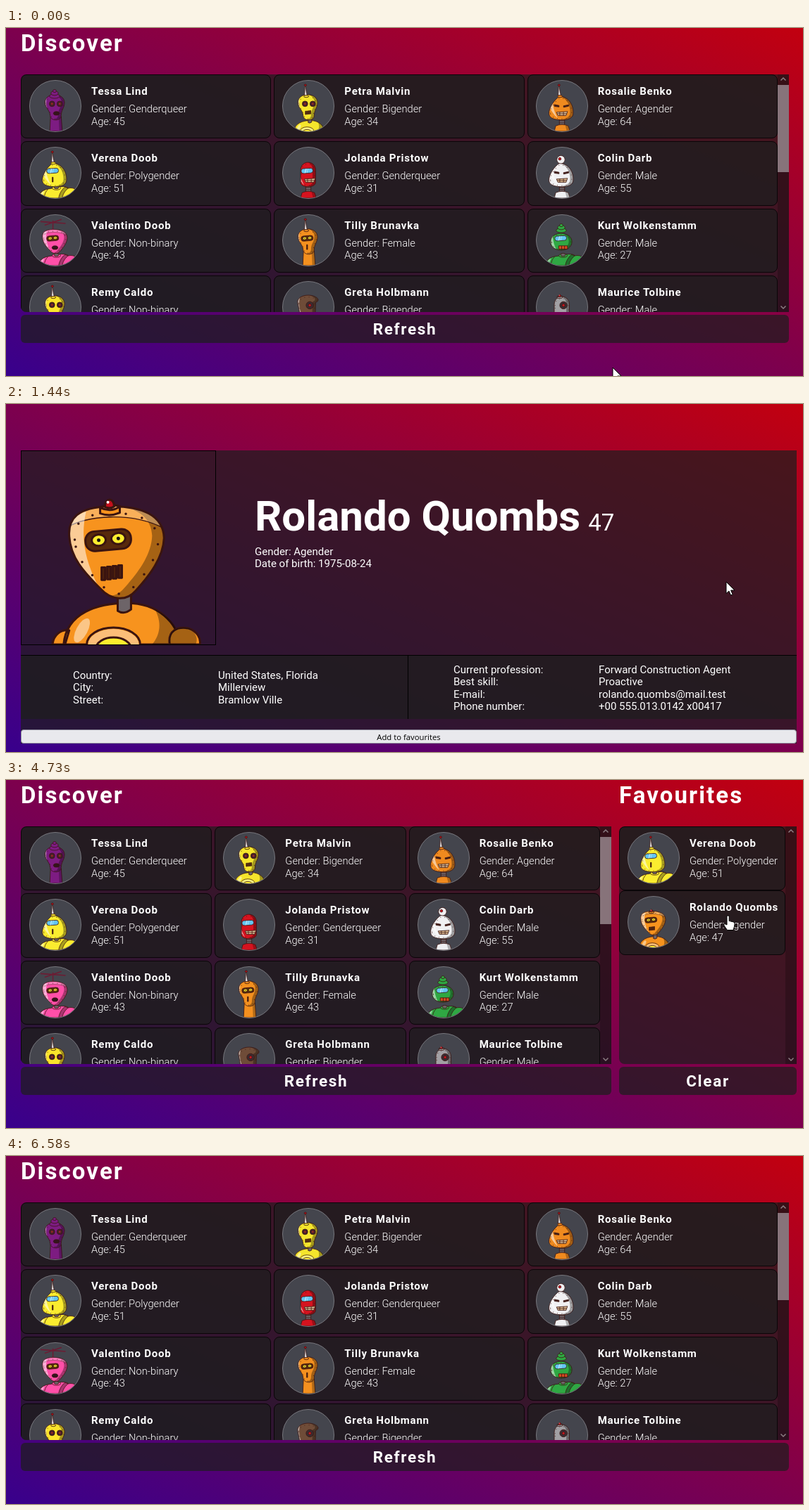
Recreate the animation shown at these times as an HTML page. Size 1131 by 495 pixels, loop 6.62 s.

```html
<!DOCTYPE html>
<html lang="en">
<head>
<meta charset="utf-8">
<title>Discover</title>
<style>
html, body { margin: 0; width: 100%; height: 100%; overflow: hidden; }
body { position: relative; background: linear-gradient(to top right, #38008c, #c2000f);
  color: #fff; font: 15px/18px Roboto, sans-serif; }
div, p, h1, h2, #cursor, #dot { position: absolute; margin: 0; box-sizing: border-box; white-space: nowrap; }
#list, #detail { inset: 0; }
.panel, .button, .sheet { background: rgba(30, 30, 30, .72); }
h1 { top: 2px; font: bold 33px/39px Roboto, sans-serif; letter-spacing: 2.1px; }
.panel { top: 66px; height: 338px; overflow: hidden; border-radius: 8px 0 0 8px; }
.grid { display: grid; grid-template-columns: repeat(3, 1fr); grid-auto-rows: 91.33px; gap: 4px; left: 0; right: 16px; }
.favs { display: block; }
.card { position: relative; height: 91.33px; border: 1px solid #0a0608; border-radius: 8px; background: rgba(30, 30, 30, .75); }
.card svg { position: absolute; left: 11px; top: 7px; width: 74px; height: 74px; box-sizing: border-box;
  border: 1px solid #77777d; border-radius: 50%; background: #44454d; }
.card p { left: 99px; font-size: 14.7px; font-weight: 300; }
.card .name { font-size: 15px; font-weight: bold; letter-spacing: .05em; }
.bar { right: 0; top: 0; width: 16px; height: 338px; background: rgba(0, 0, 0, .22); }
.bar svg { position: absolute; left: 0; top: 0; }
#thumb { width: 16px; height: 124px; background: #87737a; }
.button { top: 408px; height: 40px; border-radius: 6px; text-align: center;
  font: bold 22.5px/40px Roboto, sans-serif; letter-spacing: .075em; }
#favourites { display: none; }
.split #favourites { display: block; }
#discover, #refresh { left: 21px; width: 1090px; }
.split #discover, .split #refresh { width: 838px; }
.side { left: 870px; width: 252px; }
.sheet { left: 21px; top: 66px; width: 1101px; height: 417px; }
.portrait { left: 21px; top: 66px; width: 277px; height: 277px; border: 1px solid #000; }
.facts { left: 21px; top: 357px; width: 1101px; height: 91px; border-top: 1px solid #000; background: rgba(30, 30, 30, .75); }
.facts::after { content: ""; position: absolute; left: 549px; height: 90px; border-left: 1px solid #000; }
h2 { left: 353px; top: 125px; font: bold 60px/70px Roboto, sans-serif; }
h2 span { margin-left: 11px; font-size: 33px; font-weight: 400; }
#toggle { left: 21px; top: 463px; width: 1101px; height: 20px; border: 1px solid #8f8f9d; border-radius: 4px;
  color: #000; text-align: center; font: 11.3px/19px "Open Sans", sans-serif; }
#dot { left: -12px; top: -12px; width: 22px; height: 22px; border-radius: 50%; background: rgba(222, 212, 70, .8); }
#cursor { left: 0; top: 0; }
#cursor svg { position: absolute; left: -12px; top: -4px; }
</style>
</head>
<body>
<div id="list">
  <h1 style="left:21px">Discover</h1>
  <div class="panel" id="discover"><div class="grid" id="grid"></div>
    <div class="bar"><div id="thumb"></div></div></div>
  <div class="button" id="refresh">Refresh</div>
  <div id="favourites">
    <h1 style="left:870px">Favourites</h1>
    <div class="panel side"><div class="grid favs" id="favs"></div><div class="bar"></div></div>
    <div class="button side">Clear</div>
  </div>
</div>
<div id="detail">
  <div class="sheet"></div>
  <div id="profile"></div>
  <div id="toggle"></div>
</div>
<div id="cursor"><div id="dot"></div>
  <svg width="32" height="32" viewBox="-12 -4 32 32" fill="#fff" stroke="#000">
    <path id="arrow" d="M0 0V16.5L3.9 13 6.6 19 9.2 17.9 6.6 12H12Z"/>
    <path id="hand" d="M-2 12V1.5a1.6 1.6 0 0 1 3.2 0V7.5l6 1.4q2 .6 1.8 3L8.4 16 7 20.5H-1.5L-6 14q-1-2 1-2.4L-2 13Z"/>
  </svg>
</div>
<script>
const $ = id => document.getElementById(id);
const LOOP = 6620, INK = '#3a1410';

const heads = {
  heart: 'M68 122C66 96 80 80 125 79C172 78 202 92 203 124C202 152 182 178 162 200C150 214 128 214 112 196C88 172 70 152 68 122Z',
  drop: 'M67 179C67 149 94 104 124 86C150 86 170 98 184 119C198 140 202 170 197 189C187 209 160 216 129 214C92 212 69 202 67 179Z',
  tall: 'M96 125C96 66 178 66 178 125V190C178 222 96 222 96 190Z',
  skull: 'M82 118C82 62 186 62 188 118C188 150 170 158 170 190C170 222 112 222 110 190C108 158 82 150 82 118Z',
  round: 'M76 145C76 85 190 85 192 145C192 208 76 208 76 145Z',
  hood: 'M80 110C80 70 160 60 190 92Q196 108 178 112L176 190C170 215 100 212 94 188Z'
};
const ellipse = (x, y, rx, ry, fill, more = '') => `<ellipse cx="${x}" cy="${y}" rx="${rx}" ry="${ry}" fill="${fill}" ${more}/>`;
const path = (d, fill, more = '') => `<path d="${d}" fill="${fill}" ${more}/>`;
const bare = 'stroke="none"';

const tops = {
  antenna: c => path('M116 80C120 62 118 40 121 28H124C124 48 128 64 132 80Z', '#ddd') +
    ellipse(127, 85, 13, 6, c) + ellipse(122, 24, 6, 5, '#c4101c'),
  knob: c => path('M112 81Q126 74 140 79V88Q126 94 112 89Z', c) + path('M112 81Q126 74 140 79Q128 88 112 81Z', '#fff5') +
    path('M119 80C118 66 132 66 132 79Q126 83 119 80Z', '#c4101c') + ellipse(123, 73, 2, 2, '#fff', bare),
  ball: c => ellipse(132, 66, 22, 22, c) + ellipse(126, 62, 7, 7, '#d01020'),
  bun: c => ellipse(134, 84, 28, 12, c) + ellipse(134, 68, 20, 12, c) + ellipse(134, 56, 9, 8, c),
  rotor: () => path('M125 80V30M58 36L194 46M80 56L172 24', 'none', 'stroke="#6b1c33" stroke-width="6"'),
  none: () => ''
};
const eyes = {
  visor: () => `<g transform="rotate(-4 123 127)"><rect x="91" y="114" width="64" height="26" rx="12" fill="#63c6f2"/>${
    path('M108 139L116 115H122L114 139ZM120 139L128 115H131L123 139Z', '#fff8', bare)}</g>`,
  slot: () => `<g transform="rotate(-5 124 127)"><rect x="91" y="113" width="65" height="28" rx="13" fill="#57290c"/>${[110, 138].map(x =>
    ellipse(x, 126, 10, 8, '#fdec2e') + ellipse(x, 126, 2.5, 2.5, '#111', bare)).join('')}</g>`,
  dark: () => [112, 154].map(x => ellipse(x, 126, 15, 15, '#46202a') + ellipse(x, 126, 5, 5, '#a32a20', bare)).join(''),
  slits: () => path('M96 130L122 135V143L97 140ZM146 137L174 131V139L147 145Z', '#43201a'),
  one: () => ellipse(138, 128, 20, 20, '#3a2c32') + ellipse(138, 128, 8, 8, '#c01a22')
};
const bars = (x, y, n, h) => Array.from({length: n}, (_, i) =>
  `<rect x="${x + i * 8}" y="${y - i}" width="5" height="${h}" fill="#4d210e"/>`).join('');
const mouths = {
  grille: () => bars(114, 166, 4, 18),
  nose: () => bars(121, 162, 1, 26),
  grin: () => path('M108 172L168 168L160 190L116 190Z', '#d8b890') + path('M112 180H164M126 172V190M146 170V190', 'none'),
  open: () => ellipse(136, 178, 16, 10, '#33141c'),
  red: () => path('M112 168H160V186H112Z', '#d24a20') + path('M128 168V186M144 168V186', 'none')
};
const neck = path('M137 205V228Q146 234 156 226V205Z', '#6d6468');
const bodies = {
  wide: c => path('M44 276C46 262 56 254 68 256L62 276ZM60 276C64 230 110 217 150 217C195 217 222 245 226 276Z', c) +
    path('M190 226C214 238 224 252 225 276H186C198 262 200 244 190 226Z', '#0005', bare) +
    path('M211 276C208 256 222 250 238 253C250 257 256 268 254 276Z', c) +
    path('M211 276C208 256 222 250 238 253C248 258 252 268 248 276Z', '#0005', bare) +
    ellipse(86, 256, 8, 19, '#fff7', 'stroke="none" transform="rotate(28 86 256)"') +
    ellipse(131, 276, 38, 24, c) + ellipse(131, 276, 36, 22, '#fff6', bare) + ellipse(131, 282, 25, 16, '#fdec2e') + neck,
  shoulders: c => path('M46 276C50 246 74 226 114 224C160 210 200 210 208 222C250 214 262 240 264 276Z', c) +
    path('M156 276C160 250 176 226 190 216L208 222C186 240 178 258 176 276ZM234 276C234 255 240 235 250 227C260 238 264 258 264 276Z', '#0005') +
    path('M78 276C78 255 86 238 98 228', 'none') + path('M50 270Q56 246 78 236L66 272Z', '#fff7', bare) +
    ellipse(144, 221, 23, 10, c) + ellipse(144, 217, 13, 8, '#6d6468'),
  narrow: c => path('M124 205H152V242H124Z', '#6d6468') + path('M124 218H152M124 230H152', 'none') +
    path('M96 276L104 246Q138 232 172 246L182 276Z', c) + path('M156 243L172 247 181 276H164Z', '#0004', bare),
  column: c => path('M112 195L108 276H176L170 195Z', c) + path('M156 195H170L176 276H160Z', '#0004', bare)
};

function robot([color, head, top, eye, mouth, body]) {
  const shape = heads[head], skin = (fill, more = '') => path(shape, fill, bare + ' ' + more);
  const shift = head === 'heart' || head === 'drop' ? 0 : 8;
  const cap = head === 'heart' ? path('M60 112C90 90 160 86 206 112V70H60Z', '#fff4', 'stroke-width="1.5"') : '';
  return `<svg viewBox="0 0 276 276"><g stroke="${INK}" stroke-width="3" stroke-linejoin="round">${bodies[body](color)}
    <g clip-path="url(#clip-${head})">${skin(color)}${skin('#0005')}${skin(color, 'transform="translate(-17 -3)"')}${cap}
    ${path('M62 100C62 140 86 180 116 206C94 166 82 130 92 86Z', '#fff8', bare)}</g>
    ${path(shape, 'none')}
    ${path(shape, 'none', 'transform="translate(16 19) scale(.88)" stroke-width="4" stroke-linecap="round" stroke-dasharray="0 27"')}
    ${tops[top](color)}<g transform="translate(${shift})">${eyes[eye]()}${mouths[mouth]()}</g></g></svg>`;
}

const people = `Tessa Lind|Genderqueer|45|#7d1c82 skull bun dark open column
Petra Malvin|Bigender|34|#f5e52c skull antenna dark grille wide
Rosalie Benko|Agender|64|#ef8a1f drop antenna slits grin narrow
Verena Doob|Polygender|51|#fbec2f drop antenna visor nose shoulders
Jolanda Pristow|Genderqueer|31|#d5131f tall none visor grin narrow
Colin Darb|Male|55|#f0f0f2 drop ball slits grin narrow
Valentino Doob|Non-binary|43|#ff4fa8 heart rotor slot open shoulders
Tilly Brunavka|Female|43|#f3901f skull antenna slot nose column
Kurt Wolkenstamm|Male|27|#2fa843 round bun visor red shoulders
Remy Caldo|Non-binary|24|#fbe42b skull antenna dark red narrow
Greta Holbmann|Bigender|50|#6f4c38 hood none one open wide
Maurice Tolbine|Male|43|#a2a0a4 tall knob one grin narrow
Osvaldo Renbick|Male|51|#f28d1c tall antenna slot grille wide
Norbert Zielund|Genderfluid|33|#2ba2e4 heart none one open narrow
Rolando Quombs|Agender|47|#f7931e heart knob slot grille wide
Elvina Marsk|Female|38|#2fa843 drop antenna visor grin narrow
Tobin Fellwick|Male|29|#d5131f skull knob dark open column
Ilka Brandul|Agender|60|#2ba2e4 round ball slits red shoulders
Jorun Pallix|Bigender|41|#7d1c82 heart antenna slot grille wide
Mirle Sandok|Female|36|#f0f0f2 tall knob visor nose narrow
Dorin Kvelt|Male|22|#fbe42b hood none one open wide`.split('\n').map(row => {
  const [name, gender, age, look] = row.split('|');
  return {name, gender, age, picture: robot(look.split(' '))};
});

const VERENA = 3, ROLANDO = 14;
Object.assign(people[VERENA], {born: '1971-05-23',
  home: ['United States, Montana', 'East Racheleport', 'Orletta Village'],
  work: ['Community-Services Manager', 'Communication', 'verena.doob@mail.test', '+000 555.014.0168 x1083']});
Object.assign(people[ROLANDO], {born: '1975-08-24',
  home: ['United States, Florida', 'Millerview', 'Bramlow Ville'],
  work: ['Forward Construction Agent', 'Proactive', 'rolando.quombs@mail.test', '+00 555.013.0142 x00417']});

const text = (x, y, value, name = '') => `<p class="${name}" style="left:${x}px;top:${y}px">${value}</p>`;
const lines = (x, y, values) => values.map((v, i) => text(x, y + i * 17.5, v)).join('');
const card = p => `<div class="card">${p.picture}${text(99, 14, p.name, 'name')}${
  lines(99, 39, ['Gender: ' + p.gender, 'Age: ' + p.age])}</div>`;
const profile = p => `<div class="portrait">${p.picture}</div><div class="facts"></div>
  <h2>${p.name}<span>${p.age}</span></h2>
  ${lines(353, 200.5, ['Gender: ' + p.gender, 'Date of birth: ' + p.born])}
  ${lines(95, 376.5, ['Country:', 'City:', 'Street:'])}${lines(301, 376.5, p.home)}
  ${lines(635, 368.5, ['Current profession:', 'Best skill:', 'E-mail:', 'Phone number:'])}${lines(841, 368.5, p.work)}`;

document.body.insertAdjacentHTML('beforeend', `<svg width="0" height="0" style="position:absolute">${
  Object.entries(heads).map(([id, d]) => `<clipPath id="clip-${id}"><path d="${d}"/></clipPath>`).join('')}</svg>`);
document.querySelectorAll('.bar').forEach(bar => bar.insertAdjacentHTML('beforeend',
  `<svg width="16" height="338">${path('M4.5 8.5L8 5L11.5 8.5M4.5 329.5L8 333L11.5 329.5', 'none', 'stroke="#8b7d83" stroke-width="1.5"')}</svg>`));
$('grid').innerHTML = people.map(card).join('');

// Start time, then either the favourites of the list page or a person and whether they are a favourite
const scenes = [
  [0, {favs: []}],
  [1400, {person: ROLANDO, saved: false}],
  [2400, {person: ROLANDO, saved: true}],
  [2980, {favs: [ROLANDO]}],
  [3240, {person: VERENA, saved: false}],
  [3800, {person: VERENA, saved: true}],
  [4120, {favs: [VERENA, ROLANDO]}],
  [5020, {person: ROLANDO, saved: true}],
  [5580, {person: ROLANDO, saved: false}],
  [5860, {favs: [VERENA]}],
  [6290, {favs: []}]
];
const clicks = [1340, 2310, 3180, 3740, 4980, 5480, 6220];
const pointer = [[0, 861, 483], [440, 1025, 225], [1380, 1025, 225], [1440, 1022, 253], [1730, 1022, 253],
  [2250, 704, 469], [2400, 704, 469], [2730, 611, 353], [2980, 406, 247], [3150, 287, 208], [3250, 287, 208],
  [3650, 287, 461], [3710, 287, 469], [3820, 287, 469], [4410, 690, 253], [4710, 1025, 193], [5020, 1025, 193],
  [5440, 704, 469], [5600, 704, 469], [6160, 930, 428], [6300, 930, 428], [6570, 927, 500], [LOOP, 927, 500]];
const scrolling = [[0, 0], [440, 0], [840, 148.5], [1360, 280], [LOOP, 280]];

// Smooth curve through the keys, at rest wherever a key repeats its neighbour
function along(keys, t, k = 1) {
  const slope = i => {
    const a = keys[i - 1], b = keys[i], c = keys[i + 1];
    return !a || !c || a[k] === b[k] || b[k] === c[k] ? 0 : (c[k] - a[k]) / (c[0] - a[0]);
  };
  const i = Math.max(1, keys.findIndex(key => key[0] > t)), [a, b] = [keys[i - 1], keys[i]];
  const d = b[0] - a[0], u = (t - a[0]) / d, s = u * u * (3 - 2 * u);
  return a[k] + (b[k] - a[k]) * s + d * u * (1 - u) * ((1 - u) * slope(i - 1) - u * slope(i));
}

let shown;
function show(scene) {
  if (scene === shown) return;
  shown = scene;
  const {favs, person, saved} = scene;
  $('list').style.display = favs ? 'block' : 'none';
  $('detail').style.display = favs ? 'none' : 'block';
  if (favs) {
    $('list').classList.toggle('split', favs.length > 0);
    $('favs').innerHTML = favs.map(i => card(people[i])).join('');
  } else {
    $('profile').innerHTML = profile(people[person]);
    $('toggle').textContent = saved ? 'Remove from favorites' : 'Add to favourites';
  }
}

function draw(now) {
  const t = now % LOOP;
  const scene = scenes.findLast(s => s[0] <= t)[1];
  show(scene);

  const scroll = t < 1400 ? along(scrolling, t) : 0;
  $('grid').style.transform = `translateY(${-scroll}px)`;
  $('thumb').style.top = 15 + scroll * 65 / 148.5 + 'px';

  const x = along(pointer, t, 1), y = along(pointer, t, 2);
  const pressed = clicks.some(c => t >= c && t < c + 80);
  const pointing = scene.favs && y > 66 && y < 448;
  $('cursor').style.transform = `translate(${Math.round(x)}px, ${Math.round(y)}px)`;
  $('arrow').style.display = pointing ? 'none' : '';
  $('hand').style.display = pointing ? '' : 'none';
  $('dot').style.display = pressed ? '' : 'none';
  const hover = y >= 463 && y < 483;
  $('toggle').style.background = !hover ? '#e9e9ed' : pressed ? '#b1b1b9' : '#d0d0d7';
  requestAnimationFrame(draw);
}
requestAnimationFrame(draw);
</script>
</body>
</html>
```
